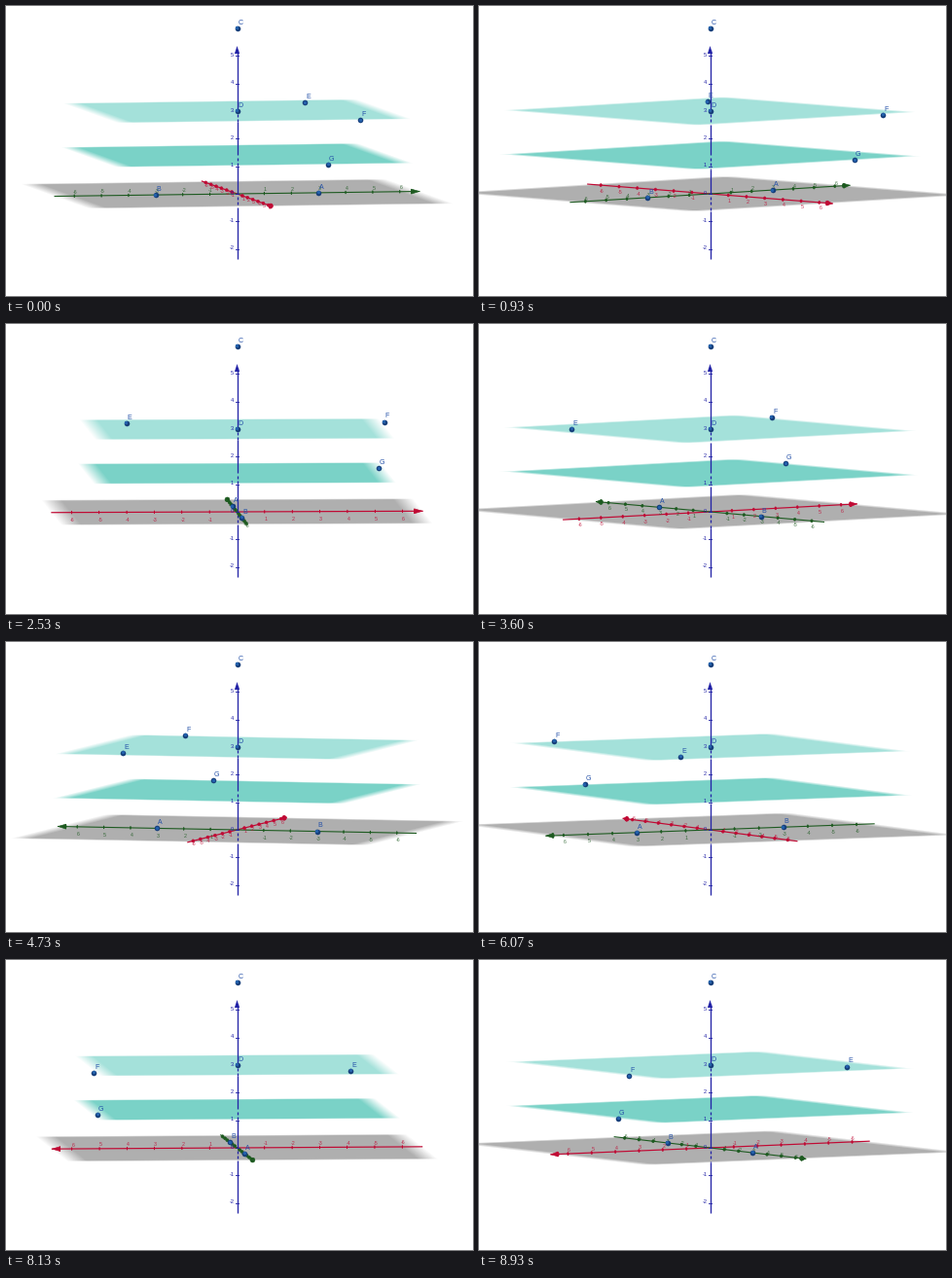
These frames come from a looping animation (480x298 px, 8.99 s). A matplotlib script:

```python
import math
import numpy as np
import matplotlib.pyplot as plt
from matplotlib.animation import FuncAnimation
from matplotlib.collections import LineCollection, PolyCollection

W, H, DPI = 480, 298, 100
INTERVAL, FRAMES = 31, 290
CX, CY = 237.5, 193.0           # origin on the stage
UNIT, TILT, ZUNIT = 28.4, 0.0693, 28.33
START, STEP = 10.9, 2.165       # degrees; the view turns 15 times a second
REACH = 6.72                    # half length of the x and y axes

RED, GREEN, BLUE = "#c00a34", "#1d5a20", "#2222a6"
PT = 72 / DPI

plt.rcParams["font.family"] = "Liberation Sans"
fig = plt.figure(figsize=(W / DPI, H / DPI), dpi=DPI, facecolor="white")
ax = fig.add_axes([0, 0, 1, 1])
ax.set_xlim(0, W)
ax.set_ylim(H, 0)
ax.axis("off")


def project(x, y, z, a):
    """Stage position of a point in space for view angle a."""
    c, s = math.cos(a), math.sin(a)
    u, v = x * s + y * c, y * s - x * c
    return CX + UNIT * u, CY - UNIT * v * TILT - ZUNIT * z


class Plane:
    def __init__(self, z, half, color, fade):
        self.half, self.fade = half, fade
        self.mid = CY - ZUNIT * z
        top, bottom = int(self.mid) - 22, int(self.mid) + 24
        px, py = np.meshgrid(np.arange(W) + 0.5, np.arange(top, bottom) + 0.5)
        self.u = (px - CX) / UNIT
        self.v = (self.mid - py) / (UNIT * TILT)
        self.rgba = np.ones(px.shape + (4,))
        self.rgba[..., :3] = np.array(color) / 255
        self.img = ax.imshow(self.rgba, extent=[0, W, bottom, top], aspect="auto",
                             interpolation="nearest", zorder=1)

    def turn(self, a):
        c, s = math.cos(a), math.sin(a)
        x, y = self.u * s - self.v * c, self.u * c + self.v * s
        edge = [np.clip((1 - np.abs(t) / self.half) / self.fade, 0, 1) for t in (x, y)]
        self.rgba[..., 3] = edge[0] * edge[1]
        self.img.set_data(self.rgba)

    def hidden(self, a):
        """Stretch of the vertical axis covered by the near half."""
        near = self.half / max(abs(math.cos(a)), abs(math.sin(a)))
        return self.mid, self.mid + near * UNIT * TILT


planes = [Plane(0, 6.74, (175, 175, 175), 0.11),
          Plane(1.4, 5.48, (122, 210, 199), 0.12),
          Plane(3, 5.43, (164, 225, 218), 0.12)]
ax.set_xlim(0, W)
ax.set_ylim(H, 0)

RING = np.linspace(0, 2 * math.pi, 13)[:-1]


def disc(center, d, short, r):
    """Disc around an axis with stage direction d, seen at an angle."""
    thin = r * math.sqrt(max(0, 1 - short ** 2))
    n = np.array([-d[1], d[0]])
    return center + np.outer(np.cos(RING) * thin, d) + np.outer(np.sin(RING) * r, n)


class FloorAxis:
    def __init__(self, unit, color, line_width):
        self.unit = unit
        self.line, = ax.plot([], [], color=color, lw=line_width * PT, zorder=3)
        self.solid = PolyCollection([], facecolors=color, edgecolors=color,
                                    linewidths=0.6 * PT, zorder=4)
        ax.add_collection(self.solid)
        self.marks = [i for i in range(-6, 7) if i]
        self.texts = [ax.text(0, 0, str(i), color=color, fontsize=5.3 * PT, alpha=0.8,
                              ha="center", va="center", zorder=5) for i in self.marks]

    def at(self, t, a):
        return np.array(project(self.unit[0] * t, self.unit[1] * t, 0, a))

    def turn(self, a, drop):
        tail, tip = self.at(-REACH, a), self.at(REACH, a)
        self.line.set_data(*zip(tail, tip))
        span = np.hypot(*(tip - tail))
        d, short = (tip - tail) / span, min(1, span / (2 * REACH * UNIT))
        base = self.at(REACH - 0.29, a)
        n = np.array([-d[1], d[0]]) * 2.4
        shapes = [disc(base, d, short, 2.4), np.array([tip, base + n, base - n])]
        for i, text in zip(self.marks, self.texts):
            p = self.at(i, a)
            shapes.append(disc(p, d, short, 1.5))
            text.set_position((p[0] + 1, p[1] + drop))
        self.solid.set_verts(shapes)


x_axis = FloorAxis((1, 0), RED, 1.2)
y_axis = FloorAxis((0, 1), GREEN, 1.1)

# vertical axis: fixed apart from the stretches behind the planes
z_line = LineCollection([], colors=BLUE, linewidths=1.3 * PT, zorder=3)
ax.add_collection(z_line)
ax.fill([CX, CX - 2.6, CX + 2.6], [41, 49, 49], color=BLUE, lw=0, zorder=4)
for i in range(-2, 6):
    y = CY - ZUNIT * i
    ax.plot([CX - 1.8, CX + 1.8], [y, y], color=BLUE, lw=0.9 * PT, zorder=4)
    ax.text(CX - 5.3, y - 1, str(i), color=BLUE, fontsize=5.6 * PT,
            ha="center", va="center", zorder=5)


def z_segments(a):
    segments, y = [], 45
    for plane in reversed(planes):
        top, bottom = plane.hidden(a)
        segments.append([(CX, y), (CX, top)])
        dash = top + 2.5
        while dash < bottom:
            segments.append([(CX, dash), (CX, min(dash + 3, bottom))])
            dash += 5.5
        y = bottom
    segments.append([(CX, y), (CX, 260)])
    return segments


points = {"A": (0, 3, 0), "B": (0, -3, 0), "C": (0, 0, 6), "D": (0, 0, 3),
          "E": (-3.84, 3.23, 3), "F": (5.52, 3.475, 3), "G": (5.27, 2.34, 1.4)}
balls = ax.scatter([0] * 7, [0] * 7, s=(5.6 * PT) ** 2, c="#173f7a", lw=0, zorder=6)
shine = ax.scatter([0] * 7, [0] * 7, s=(3.4 * PT) ** 2, c="#2361ac", lw=0, zorder=7)
names = [ax.text(0, 0, k, color="#2450a8", fontsize=7 * PT, ha="center", va="center",
                 zorder=8) for k in points]


def draw(frame):
    k = round(frame * INTERVAL * 15 / 1000)
    a = math.radians(START + STEP * k)
    for plane in planes:
        plane.turn(a)
    x_axis.turn(a, 2 + 6 * math.sin(a))
    y_axis.turn(a, 2 - 6 * math.cos(a))
    z_line.set_segments(z_segments(a))
    spots = np.array([project(*p, a) for p in points.values()])
    balls.set_offsets(spots)
    shine.set_offsets(spots + (-0.4, -0.6))
    for text, (x, y) in zip(names, spots):
        text.set_position((x + 3.4, y - 5.6))
    return []


anim = FuncAnimation(fig, draw, frames=FRAMES, interval=INTERVAL,
                     init_func=lambda: draw(0), repeat=True, repeat_delay=0)
plt.show()
```
